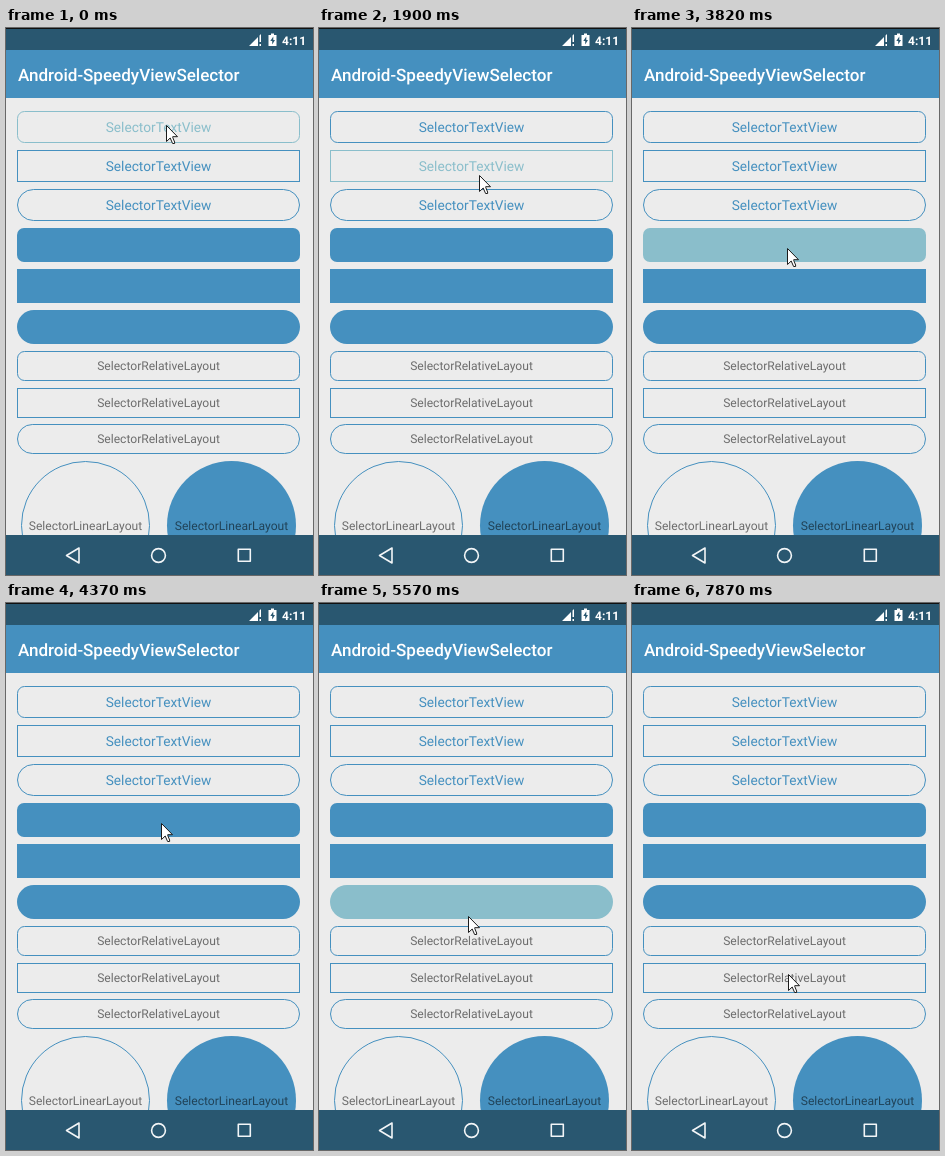
Recreate the animation shown at these times as an HTML page. Size 307 px wide and 547 px high, loop 7990 ms.

```html
<!DOCTYPE html>
<html lang="en">
<head>
<meta charset="utf-8">
<title>Selector demo</title>
<style>
  html, body { margin: 0; width: 100%; height: 100%; overflow: hidden; background: #ececec; }
  svg { display: block; width: 307px; height: 547px; font-family: Roboto, Arial, sans-serif; text-rendering: geometricPrecision; }
  .item { --c: #4590bf; }
  .item.pressed { --c: #8abecb; }
  .line { fill: none; stroke: var(--c, #4590bf); }
  .solid { fill: var(--c, #4590bf); }
  .link { fill: var(--c); font-size: 13.7px; }
  .label { fill: #000; fill-opacity: .54; font-size: 12.1px; }
  .link, .label { text-anchor: middle; }
  .nav { fill: none; stroke: #f2f5f7; stroke-width: 1.6; stroke-linejoin: round; }
</style>
</head>
<body>
<svg viewBox="0 0 307 547">
  <rect width="307" height="547" fill="#ececec"/>
  <rect width="307" height="70" fill="#4590bf"/>
  <rect width="307" height="22" fill="#295770"/>
  <rect width="307" height="1" fill="#111"/>

  <g fill="#fff">
    <path d="M243 18L252 9V18ZM253.5 7.5L255 6V14H253.5ZM253.5 16H255V18H253.5Z"/>
    <path d="M262.5 7H265V5.5H268V7H270.5V18H262.5Z"/>
    <path d="M267.3 8.5L264.3 13H266.2V16.5L269 12H267.3Z" fill="#295770"/>
    <text x="276" y="17" font-size="12" font-weight="700">4:11</text>
    <text x="12" y="53" font-size="17.06" font-weight="500">Android-SpeedyViewSelector</text>
  </g>

  <g id="items"></g>

  <circle class="line" cx="79.5" cy="497.5" r="64"/>
  <circle class="solid" cx="225.5" cy="497.5" r="64.5"/>
  <text class="label" x="79.5" y="502">SelectorLinearLayout</text>
  <text class="label" x="225.5" y="502">SelectorLinearLayout</text>

  <rect y="507" width="307" height="40" fill="#295770"/>
  <path class="nav" d="M60.5 527.5L73 520V535Z"/>
  <circle class="nav" cx="152.5" cy="527.5" r="6.9"/>
  <rect class="nav" x="232.3" y="521.3" width="12" height="12"/>

  <path id="cursor" d="M.5 .5V16.5L4.2 13L6.6 18.5H8.6V17L6.7 12.3V11.7H11.5Z" fill="#fff" stroke="#1c1c1c"/>
</svg>
<script>
const LOOP = 7990, GAP = 7, MOVE_DELAY = 125;

const groups = [
  { height: 32, type: 'link', caption: 'SelectorTextView' },
  { height: 34 },
  { height: 29.7, type: 'label', caption: 'SelectorRelativeLayout' }
];

// Each group is stacked in three corner styles: rounded, square, pill.
const rows = [];
let nextTop = 83;
for (const group of groups) {
  for (const radius of [7, 0, group.height / 2]) {
    rows.push({ ...group, radius, top: Math.round(nextTop), height: Math.round(group.height) });
    nextTop += group.height + GAP;
  }
}

// Pointer stops: press time, hold, x, y. A hold of 0 only passes through.
const stops = [
  [0, 590, 160, 97], [1120, 280, 160, 97], [1535, 0, 160, 123],
  [1900, 590, 160, 147], [2890, 530, 160, 175], [3820, 430, 155, 220],
  [4740, 430, 154, 261], [5570, 400, 149, 313], [6240, 0, 153, 353],
  [6640, 400, 159, 337], [7440, 430, 156, 371]
];

function rowMarkup({ top, height, radius, type, caption }) {
  const inset = caption ? .5 : 0;
  const box = `<rect class="${caption ? 'line' : 'solid'}" x="${11 + inset}" y="${top + inset}"
    width="${283 - 2 * inset}" height="${height - 2 * inset}" rx="${radius}"/>`;
  const baseline = top + height / 2 + (type === 'link' ? 5 : 4);
  const text = caption ? `<text class="${type}" x="152.5" y="${baseline}">${caption}</text>` : '';
  return `<g class="item">${box}${text}</g>`;
}

const items = document.getElementById('items');
const cursor = document.getElementById('cursor');
items.innerHTML = rows.map(rowMarkup).join('');

function draw(t) {
  // The pointer leaves for the next stop shortly after each release.
  const [press, hold, x, y] = stops.find(([p, h]) => t < p + h + MOVE_DELAY);
  const down = t >= press && t < press + hold;
  rows.forEach(({ top, height }, i) =>
    items.children[i].classList.toggle('pressed', down && y >= top && y < top + height));
  cursor.setAttribute('transform', `translate(${x} ${y})`);
}

const start = performance.now();
function tick() {
  draw((performance.now() - start) % LOOP);
  requestAnimationFrame(tick);
}
tick();
</script>
</body>
</html>
```
